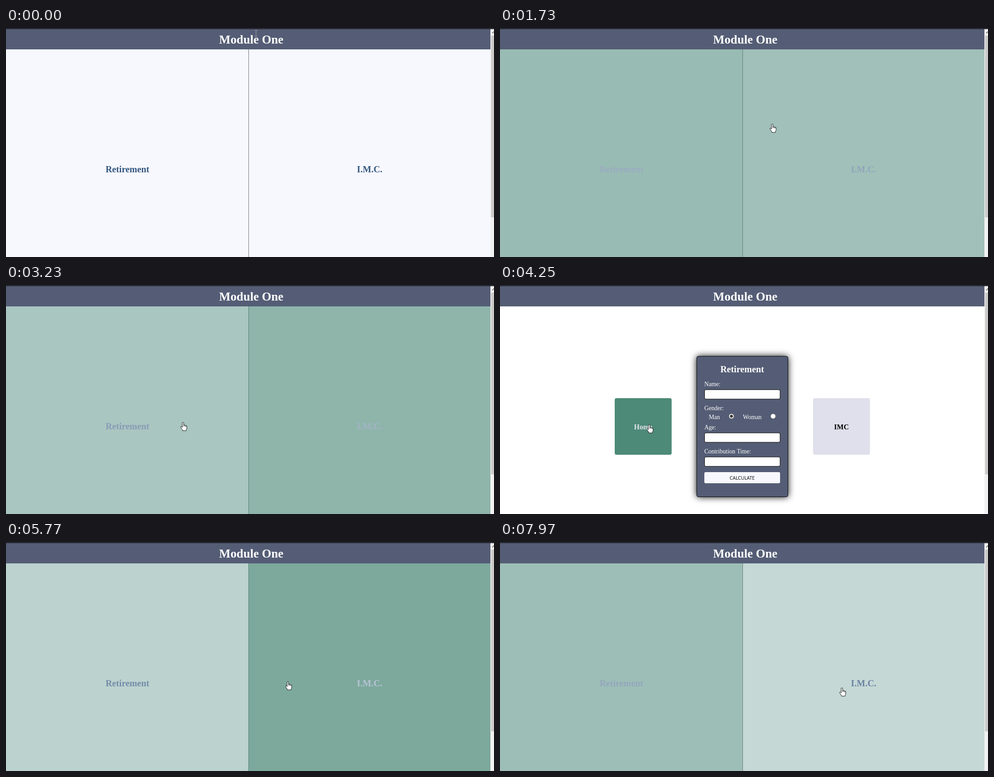
These frames come from a looping animation (1089x514 px, 8 s). An HTML page with a canvas:

```html
<!DOCTYPE html>
<html lang="en">
<head>
<meta charset="utf-8">
<title>Module One</title>
<style>
html, body { margin: 0; width: 100%; height: 100%; overflow: hidden; background: #fff; }
canvas { display: block; }
</style>
</head>
<body>
<canvas id="stage" width="1089" height="514"></canvas>
<script>
const ctx = document.getElementById('stage').getContext('2d');
const LOOP = 8000, FADE = 500;
const SLATE = '#545d75', PALE = [247, 248, 254], GREEN = [65, 131, 110];
const NAVY = [52, 87, 126], LILAC = [224, 224, 236], BLACK = [0, 0, 0], LINE = [112, 114, 120];
const SERIF = '"Liberation Serif", "Times New Roman", serif';
const BIG = `bold 27.04px ${SERIF}`, MEDIUM = `bold 20.28px ${SERIF}`;
const BUTTON = `bold 16px ${SERIF}`, LABEL = `13.52px ${SERIF}`;
const SMALL = '10.5px "Open Sans", "Noto Sans", sans-serif';

const pages = [[0, 'home'], [3600, 'retirement'], [4570, 'home'], [5990, 'imc'], [7600, 'home']];
const scrolling = [[2050, 0], [2130, 25], [2290, 72], [2800, 72], [3100, 0]];
const pointer = [
  [610, 558, 12], [720, 470, 60], [930, 313, 202], [1320, 300, 255], [1420, 340, 250],
  [1590, 541, 222], [1800, 640, 212], [2130, 620, 208], [2300, 640, 230], [2900, 640, 290],
  [3102, 541, 304], [3230, 395, 308], [3650, 395, 308], [3930, 372, 311], [4010, 338, 313],
  [4170, 333, 313], [4570, 333, 313], [5370, 400, 311], [5575, 541, 311], [5770, 629, 313],
  [5900, 623, 306], [6630, 623, 306], [6820, 755, 318], [7050, 760, 322], [7330, 335, 325],
  [7700, 335, 326], [7875, 541, 327], [7970, 763, 327]
];
// Hover changes: [time, on]
const hovers = {
  left: [[720, 1], [1590, 0], [3102, 1], [3600, 0], [4600, 1], [5575, 0], [7625, 1], [7875, 0]],
  right: [[1590, 1], [3102, 0], [5575, 1], [5990, 0], [7875, 1]],
  home: [[3920, 1], [4570, 0], [7280, 1], [7600, 0]],
  other: [[6740, 1], [7090, 0]]
};

const lerp = (a, b, k) => a + (b - a) * k;
const mix = (a, b, k) => `rgb(${a.map((v, i) => Math.round(lerp(v, b[i], k)))})`;

// cubic-bezier(.25, .1, .25, 1)
function ease(x) {
  if (x <= 0) return 0;
  if (x >= 1) return 1;
  let lo = 0, hi = 1;
  for (let i = 0; i < 24; i++) {
    const s = (lo + hi) / 2, r = 1 - s;
    if (0.75 * r * s + s ** 3 < x) lo = s; else hi = s;
  }
  const r = 1 - lo;
  return 0.3 * r * r * lo + 3 * r * lo * lo + lo ** 3;
}

// A reversed transition takes time in proportion to the way back.
function hover(name, t) {
  let from = 0, to = 0, start = 0;
  const value = now => from === to ? to
    : lerp(from, to, ease((now - start) / (FADE * Math.abs(to - from))));
  for (const [time, on] of hovers[name]) {
    if (time > t) break;
    from = value(time);
    to = on;
    start = time;
  }
  return value(t);
}

function along(keys, t) {
  const next = keys.findIndex(k => k[0] > t);
  if (next === 0) return keys[0].slice(1);
  if (next < 0) return keys[keys.length - 1].slice(1);
  const a = keys[next - 1], b = keys[next], k = (t - a[0]) / (b[0] - a[0]);
  return a.slice(1).map((v, i) => lerp(v, b[i + 1], k));
}

function rect(x, y, w, h, fill) {
  ctx.fillStyle = fill;
  ctx.fillRect(x, y, w, h);
}

function rounded(x, y, w, h, r, fill, stroke) {
  ctx.beginPath();
  ctx.roundRect(x, y, w, h, r);
  ctx.fillStyle = fill;
  ctx.fill();
  if (stroke) outline(stroke);
}

function outline(color, width = 1) {
  ctx.shadowBlur = 0;
  ctx.lineWidth = width;
  ctx.strokeStyle = color;
  ctx.stroke();
}

function text(str, x, y, font, fill, align = 'center') {
  ctx.font = font;
  ctx.fillStyle = fill;
  ctx.textAlign = align;
  ctx.fillText(str, x, y);
}

function disc(x, y, r, fill) {
  ctx.beginPath();
  ctx.arc(x, y, r, 0, 7);
  ctx.fillStyle = fill;
  ctx.fill();
}

function drawHeader() {
  rect(0, 2, 1081, 46, SLATE);
  text('Module One', 547.3, 35, BIG, '#fff');
}

function drawHome(t) {
  const left = hover('left', t), right = hover('right', t);
  rect(0, 48, 541, 540, mix(PALE, GREEN, left));
  rect(541, 48, 540, 540, mix(PALE, GREEN, right));
  rect(541, 48, 1, 540, mix(LINE, GREEN, right));
  text('Retirement', 271, 324, MEDIUM, mix(NAVY, PALE, left));
  text('I.M.C.', 811.5, 324, MEDIUM, mix(NAVY, PALE, right));
}

function drawButton(label, x, amount) {
  rounded(x, 254, 127, 127, 4, mix(LILAC, GREEN, amount));
  text(label, x + 63.5, 323.5, BUTTON, mix(BLACK, PALE, amount));
}

function drawCard(title, top, height) {
  ctx.shadowColor = '#000';
  ctx.shadowBlur = 16;
  rounded(439, top, 203.5, height, 4, SLATE, '#000');
  text(title, 540.5, top + 35.5, MEDIUM, '#fff');
}

function drawField(label, baseline) {
  text(label, 456, baseline, LABEL, '#fff', 'left');
  rounded(456.5, baseline + 8.5, 168.5, 21, 3, '#fff', '#000');
}

function drawSubmit(y) {
  rounded(456, y, 169, 25, 3, '#f7f8fe');
  text('CALCULATE', 540.5, y + 17, SMALL, '#000');
}

function drawRetirement() {
  drawCard('Retirement', 160, 315.5);
  drawField('Name:', 226.5);
  text('Gender:', 456, 280.5, LABEL, '#fff', 'left');
  text('Man', 466, 300.5, LABEL, '#fff', 'left');
  text('Woman', 542, 300.5, LABEL, '#fff', 'left');
  for (const x of [516.5, 609.5]) {
    disc(x, 294.5, 5.5, '#fff');
    outline('#666', 0.6);
  }
  disc(516.5, 294.5, 3.3, '#333');
  drawField('Age:', 323.5);
  drawField('Contribution Time:', 377.5);
  drawSubmit(420);
}

function drawImc() {
  drawCard('IMC', 183, 270);
  drawField('Name:', 249.5);
  drawField('Weight:', 303.5);
  drawField('Height:', 357.5);
  drawSubmit(400);
}

function drawForm(page, t) {
  rect(0, 48, 1081, 466, '#fff');
  drawButton('Home', 256, hover('home', t));
  drawButton(page === 'imc' ? 'Retirement' : 'IMC', 698.5, hover('other', t));
  if (page === 'imc') drawImc(); else drawRetirement();
}

function drawFrame(scroll) {
  rect(1081, 0, 8, 514, '#f1f1f1');
  rect(1082.5, 17 + scroll * 0.88, 7, 408, '#cbcac8');
  ctx.beginPath();
  ctx.moveTo(1085, 12);
  ctx.lineTo(1089, 8);
  outline('#505050', 1.5);
  rect(0, 0, 1089, 2.5, '#25252f');
}

const hand = new Path2D('M-1.6 1Q0-.8 1.6 1V6.5Q3.2 5.3 4.2 7Q5.7 6 6.6 7.8Q8.6 7.2 8.6 9V13' +
  'Q8.6 15.5 7.2 17V19H-1V17.5Q-3 15-5 11.5Q-5.5 9-3.5 9.6L-1.6 11.5Z');
const arrow = new Path2D('M0 0V14L3.2 11L5.4 16L7.5 15L5.4 10.2H10Z');
const beam = new Path2D('M-3-7H-1L0-6L1-7H3M0-6V6M-3 7H-1L0 6L1 7H3');

function drawPointer(page, t) {
  const [x, y] = along(pointer, t);
  ctx.save();
  ctx.translate(x, y);
  ctx.lineWidth = 1;
  if (page === 'home' && y < 48) {
    ctx.strokeStyle = '#aaa0a5';
    ctx.stroke(beam);
  } else {
    const overForm = page === 'imc' && t > 6400 && x > 383 && x < 698;
    const shape = overForm ? arrow : hand;
    ctx.fillStyle = '#fff';
    ctx.strokeStyle = '#111';
    ctx.fill(shape);
    ctx.stroke(shape);
    if (!overForm) ctx.stroke(new Path2D('M1.6 6.5V9.5M4.2 7V9.5M6.6 7.8V10'));
  }
  ctx.restore();
}

function render(t) {
  const page = pages.filter(p => p[0] <= t).pop()[1];
  const [scroll] = along(scrolling, t);
  ctx.save();
  ctx.translate(0, -scroll);
  drawHeader();
  if (page === 'home') drawHome(t); else drawForm(page, t);
  ctx.restore();
  drawFrame(scroll);
  drawPointer(page, t);
}

const begin = performance.now();
function tick() {
  render((performance.now() - begin) % LOOP);
  requestAnimationFrame(tick);
}
tick();
</script>
</body>
</html>
```
